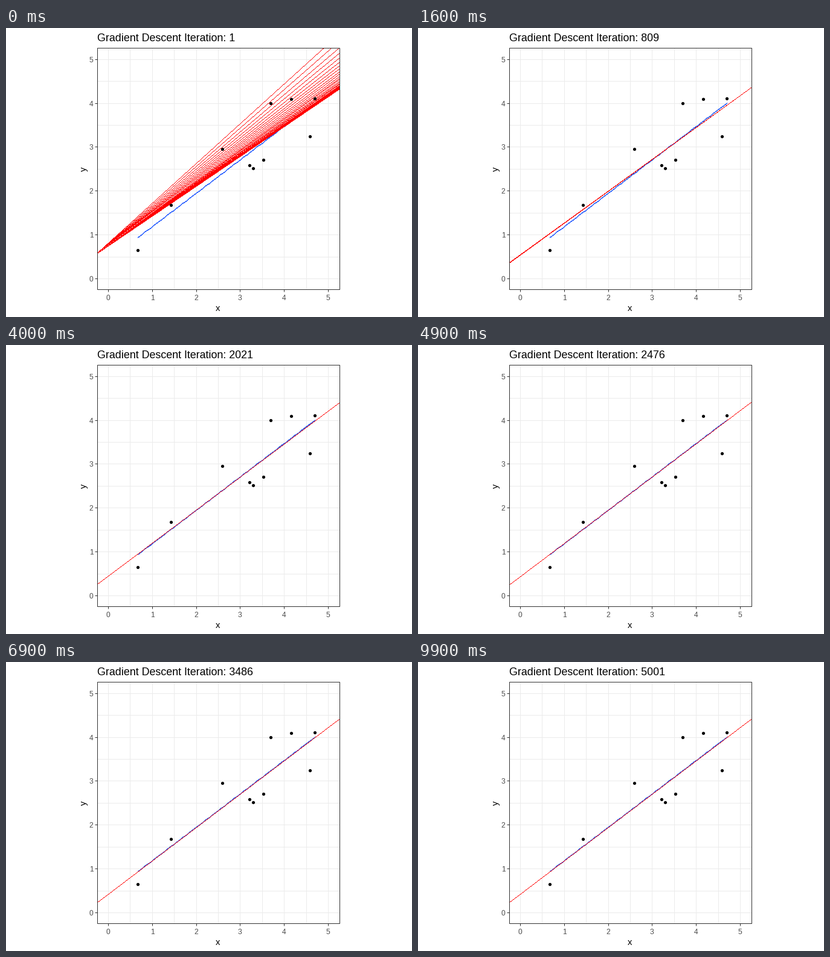
A matplotlib script that plays this animation: 672x480 px, repeating every 10000 ms.

```python
import numpy as np
import matplotlib.pyplot as plt
from matplotlib.animation import FuncAnimation
from matplotlib.patches import Circle, Rectangle

W, H, DPI = 672, 480, 96
PT = 72 / DPI                      # points per pixel
FRAMES, STEPS, RATE = 100, 5001, 0.01
LEFT, RIGHT, TOP, BOTTOM = 151.5, 552.5, 33.5, 434.5
LO, HI = -0.25, 5.25
SCALE = (RIGHT - LEFT) / (HI - LO)
X0, Y0 = 169.23, 416.69            # pixel position of the data origin

X = np.array([0.68, 1.43, 2.60, 3.21, 3.30, 3.53, 3.69, 4.16, 4.58, 4.69])
Y = np.array([0.65, 1.68, 2.95, 2.58, 2.51, 2.70, 3.99, 4.09, 3.24, 4.10])

plt.rcParams["font.family"] = "Liberation Sans"
plt.rcParams["path.simplify"] = False


def snap(v):
    """Centre of the pixel that holds v."""
    return np.floor(v) + 0.5


def px(x):
    return snap(X0 + x * SCALE)


def py(y):
    return snap(Y0 - y * SCALE)


def descend(a, b):
    """Intercept and slope at every step of least-squares descent."""
    path = np.empty((STEPS, 2))
    for k in range(STEPS):
        path[k] = a, b
        err = a + b * X - Y
        a -= RATE * err.mean()
        b -= RATE * (err * X).mean()
    return path


def stairs(xs, ys):
    """Pixel-wide horizontal dashes, one per column, along a polyline."""
    cols = np.arange(xs[0], xs[-1] + 1)
    rows = snap(np.interp(cols, xs, ys))
    rows[(rows <= TOP) | (rows >= BOTTOM)] = np.nan
    gap = np.full_like(cols, np.nan)
    return (np.column_stack([cols - 0.5, cols + 0.5, gap]).ravel(),
            np.column_stack([rows, rows, gap]).ravel())


path = descend(0.82, 0.9075)
frame_of = np.rint(np.arange(STEPS) * (FRAMES - 1) / (STEPS - 1)).astype(int)
ends = py(path[:, :1] + path[:, 1:] * np.array([LO, HI]))

fig = plt.figure(figsize=(W / DPI, H / DPI), dpi=DPI, facecolor="white")
ax = fig.add_axes([0, 0, 1, 1])
ax.set(xlim=(0, W), ylim=(H, 0))
ax.axis("off")


def line(xs, ys, color, width=1, **kw):
    return ax.plot(xs, ys, color=color, lw=width * PT, snap=False,
                   solid_capstyle="butt", **kw)[0]


def label(x, y, s, size, color="black", **kw):
    return ax.text(x, y, s, fontsize=size * PT, color=color, **kw)


# Grid, ticks and tick labels
for v in np.arange(0, 5.5, 0.5):
    gx, gy = px(v), py(v)
    line([gx, gx], [TOP, BOTTOM], "#EBEBEB")
    line([LEFT, RIGHT], [gy, gy], "#EBEBEB")
    if v == int(v):
        line([gx, gx], [BOTTOM, BOTTOM + 4], "#333333")
        line([LEFT - 4, LEFT], [gy, gy], "#333333")
        label(gx - 0.5, 452, f"{v:.0f}", 12, "#4D4D4D", ha="center")
        label(144.5, gy + 4.5, f"{v:.0f}", 12, "#4D4D4D", ha="right")

label(350.5, 470, "x", 14.7, ha="center")
label(129, 234.5, "y", 14.7, rotation=90, ha="center", va="center")
title = label(151, 22, "", 17.9)

# Least-squares fit, two pixels tall
slope, icept = np.polyfit(X, Y, 1)
fx = np.linspace(X.min(), X.max(), 80)
sx, sy = stairs(px(fx), py(icept + slope * fx))
line(sx, sy - 0.5, "#3366FF", 2, zorder=3)

trials = line([], [], "red", zorder=4)

for x, y in zip(px(X), py(Y)):
    ax.add_patch(Circle((x, y), 2.6, fc="black", lw=0, snap=False, zorder=5))

ax.add_patch(Rectangle((LEFT, TOP), RIGHT - LEFT, BOTTOM - TOP, fill=False,
                       ec="#333333", lw=PT, snap=False, zorder=6))


def update(i):
    rows = np.unique(ends[frame_of == i], axis=0)
    steps = [stairs([LEFT, RIGHT], r) for r in rows]
    trials.set_data(*np.concatenate(steps, axis=1))
    step = round(1 + i * (STEPS - 1) / (FRAMES - 1))
    title.set_text(f"Gradient Descent Iteration: {step}")
    return trials, title


anim = FuncAnimation(fig, update, frames=FRAMES, interval=100, repeat=True)
plt.show()
```
